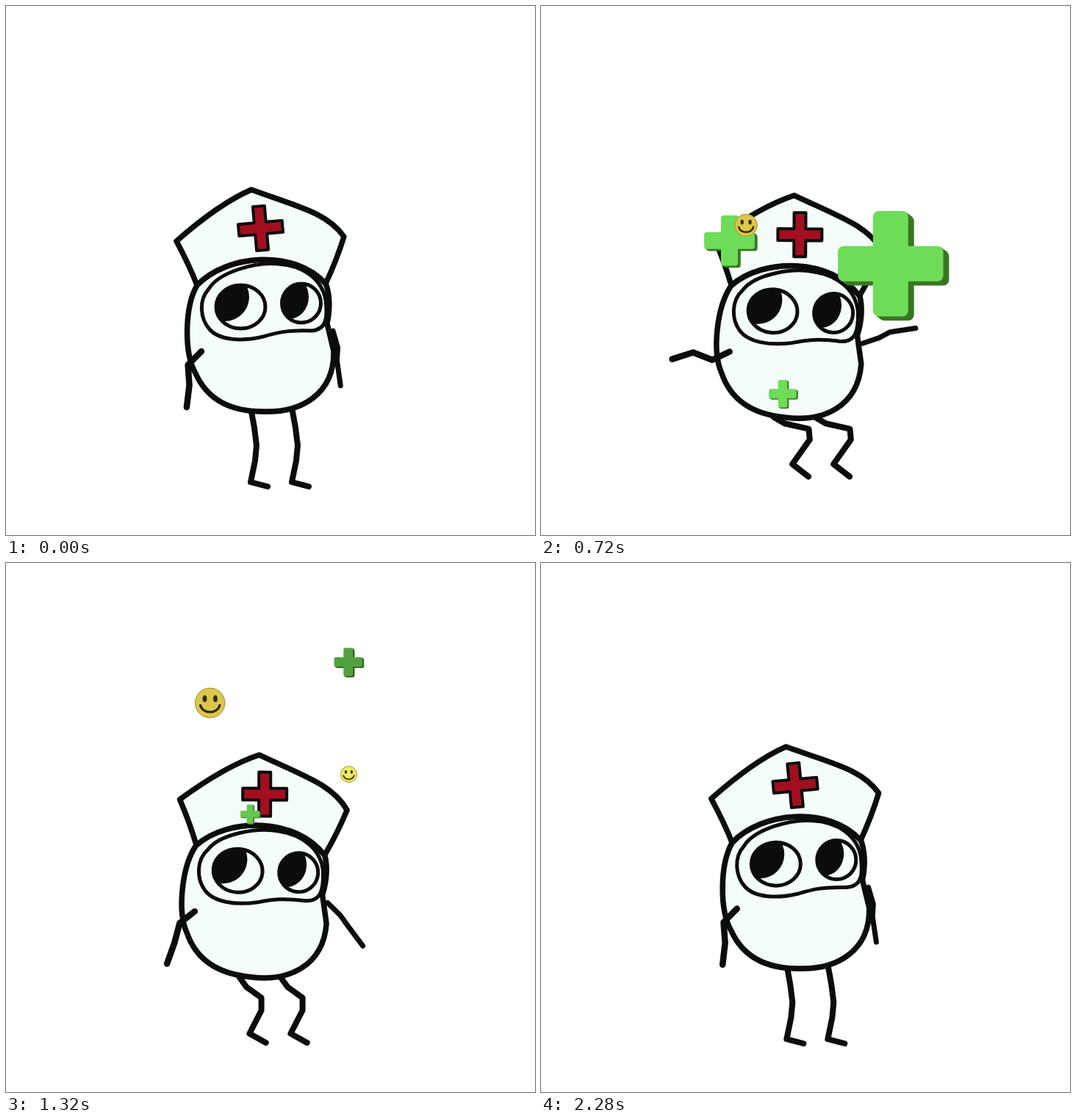
An HTML page with a canvas for the animation above (2340 ms loop, 720 by 720 pixels).

```html
<!DOCTYPE html>
<html lang="en">
<head>
<meta charset="utf-8">
<title>Jumping nurse</title>
<style>
  html, body { margin: 0; width: 100%; height: 100%; overflow: hidden; background: #fff; }
  canvas { display: block; width: 720px; height: 720px; }
</style>
</head>
<body>
<canvas id="stage" width="720" height="720"></canvas>
<script>
const ctx = document.getElementById('stage').getContext('2d');
const LOOP = 2340, STEP = 60, SWAY = 640, RAD = Math.PI / 180;
const INK = '#0b0c0c', CLOTH = '#f5fdfb', RED = '#a20f20';

const hat = new Path2D('M334 250 Q290 269 232 320 Q250 354 260 380 C300 338 392 330 435 378 Q450 346 460 314 C438 282 400 274 334 250Z');
const body = new Path2D('M260 380 C243 410 242 472 258 500 C274 536 305 552 350 552 C402 554 447 528 446 470 L437 432 C442 410 440 390 435 377 C392 330 300 338 260 380Z');
const goggles = new Path2D('M276 385 C290 362 340 348 370 351 C405 353 430 372 435 400 C438 425 436 441 415 442 C385 441 370 444 350 450 C320 457 290 455 277 440 C264 425 262 400 276 385Z');

// The few poses the body passes through; the curve between them is smooth.
const poses = [
  { t: 0, tilt: 0, y: 552, bend: 0, raise: 0 },
  { t: 500, tilt: 6.4, y: 601, bend: 1, raise: 0 },
  { t: 600, tilt: 6.4, y: 599, bend: 1, raise: 0.9 },
  { t: 900, tilt: 3.7, y: 505, bend: 1.15, raise: 1 },
  { t: 1140, tilt: 3, y: 525, bend: 0.35, raise: 0.33 },
  { t: 1540, tilt: 7.4, y: 600, bend: 1, raise: 0 },
  { t: 1860, tilt: 3, y: 557.5, bend: 0, raise: 0 },
  { t: 2280, tilt: -0.4, y: 552, bend: 0, raise: 0 },
  { t: LOOP, tilt: 0, y: 552, bend: 0, raise: 0 }
];

// Each floater rises steadily and sways; y is its height at 900 ms.
const floaters = {
  back: { born: 260, end: 700, life: 900, x: 437, sway: 0, peak: 0, y: 234, rise: 0.35, size: 48 },
  left: { born: 540, end: 1170, life: 1100, x: 259, sway: 18, peak: 1180, y: 218, rise: 0.5625, size: 47.5 },
  big: { born: 300, end: 1400, life: 1150, x: 460, sway: 25, peak: 630, y: 286, rise: 0.36, size: 72 },
  small: { born: 440, end: 1500, life: 1200, x: 330, sway: 12, peak: 550, y: 472, rise: 0.31, size: 21.5 },
  gold: { born: 700, end: 2030, life: 1330, x: 278.5, sway: 5.5, peak: 860, y: 266, rise: 0.18, size: 28 },
  pale: { born: 700, end: 1500, life: 1000, x: 467, sway: 2.5, peak: 880, y: 356, rise: 0.163, size: 21.7 }
};

const mix = (a, b, k) => a + (b - a) * k;
const clamp = v => Math.min(1, Math.max(0, v));

function pose(t) {
  const n = poses.findIndex(p => p.t > t);
  const a = poses[n - 1], b = poses[n];
  const before = poses[n - 2] || a, after = poses[n + 1] || b;
  const d = b.t - a.t, k = (t - a.t) / d;
  const curve = key => {
    const m = (b[key] - before[key]) / (b.t - before.t) * d;
    const w = (after[key] - a[key]) / (after.t - a.t) * d;
    return mix(a[key], b[key], k * k * (3 - 2 * k)) + k * (1 - k) * (m * (1 - k) - w * k);
  };
  const tilt = n > 1 ? curve('tilt') : mix(a.tilt, b.tilt, k * k * (3 - 2 * k));
  return { tilt, x: 345 - 3.25 * tilt, y: curve('y'), bend: curve('bend'), raise: clamp(curve('raise')) };
}

function paint(path, width, fill) {
  if (fill) { ctx.fillStyle = fill; ctx.fill(path); }
  ctx.lineWidth = width;
  ctx.strokeStyle = INK;
  ctx.stroke(path);
}

function oval(x, y, rx, ry) {
  const path = new Path2D();
  path.ellipse(x, y, rx, ry, 0, 0, 7);
  return path;
}

function crossPath(h, w) {
  const path = new Path2D();
  for (let q = 0; q < 4; q++) {
    const c = [1, 0, -1, 0][q], s = [0, 1, 0, -1][q];
    for (const [u, v] of [[w, -w], [h, -w], [h, w]]) path.lineTo(u * c - v * s, u * s + v * c);
  }
  path.closePath();
  return path;
}

function leg(hip, bend) {
  const straight = [[0, 0], [4, 22], [7, 46], [5, 67], [-1, 96], [22, 102]];
  const bent = [[0, 0], [14, 10], [44, 19], [45, 34], [23, 67], [45, 83]];
  const path = new Path2D();
  straight.forEach(([x, y], i) => path.lineTo(hip + mix(x, bent[i][0], bend), mix(y, bent[i][1], bend)));
  paint(path, 8);
}

// Each arm segment is a length with its hanging and raised angle.
function arm(x, y, width, raise, segments) {
  const path = new Path2D();
  path.moveTo(x, y);
  for (const [length, down, up] of segments) {
    const angle = mix(down, up, raise) * RAD;
    path.lineTo(x += length * Math.cos(angle), y += length * Math.sin(angle));
  }
  paint(path, width);
}

function eye(x, y, rx, ry, dx, dy, px, py) {
  const ball = oval(x, y, rx, ry);
  ctx.save();
  ctx.clip(ball);
  ctx.fillStyle = INK;
  ctx.fill(oval(x + dx, y + dy, px, py));
  ctx.restore();
  paint(ball, 5);
}

function nurse(t) {
  const p = pose(t);
  ctx.save();
  ctx.translate(p.x, p.y);
  leg(-11, p.bend);
  leg(45, p.bend);
  ctx.rotate(p.tilt * RAD);
  arm(100, -110, 7, Math.sqrt(p.raise), [[24, 74, -24], [17, 94, -33], [35, 82, -14]]);

  ctx.save();
  ctx.translate(-345, -552);
  paint(body, 7.5, CLOTH);
  paint(hat, 7.5, CLOTH);
  paint(goggles, 5, CLOTH);
  eye(319.5, 409.5, 33.5, 29.5, -21.5, -13.5, 33, 33);
  eye(402, 404.5, 26.5, 26.5, -17, -8.5, 27, 30);
  ctx.translate(346.5, 302.5);
  ctx.rotate(-5 * RAD);
  paint(crossPath(30, 8), 4, RED);
  ctx.restore();

  arm(-79, -82, 8.5, p.raise, [[26, 135, 149], [28, 86, 196], [30, 97, 157]]);
  ctx.restore();
}

function place(f, t, pop) {
  if (t <= f.born || t >= f.end) return null;
  const grown = Math.sin(Math.PI * ((t - f.born) / f.life) ** pop);
  return {
    x: f.x + f.sway * grown * Math.cos((t - f.peak) / SWAY * 2 * Math.PI),
    y: f.y - f.rise * (t - 900),
    size: f.size * grown
  };
}

function plus(f, t) {
  const p = place(f, t, 0.75);
  if (!p || p.size <= 0) return;
  const { x, y, size } = p;
  const r = size * 0.11, path = crossPath(size - r, size * 0.335 - r);
  const shade = clamp((t - f.end + 230) / 200);
  const tone = (a, b) => `rgb(${a.map((v, i) => Math.round(mix(v, b[i], shade)))})`;
  const side = tone([58, 118, 34], [35, 82, 20]), face = tone([111, 220, 88], [74, 140, 54]);
  ctx.lineWidth = r * 2;
  for (let i = 5; i >= 0; i--) {
    ctx.save();
    ctx.translate(x + size * 0.022 * i, y + size * 0.016 * i);
    ctx.fillStyle = ctx.strokeStyle = i ? side : face;
    ctx.fill(path);
    ctx.stroke(path);
    ctx.restore();
  }
}

function smiley(f, t, color) {
  const p = place(f, t, 0.4);
  if (!p) return;
  const { x, y, size: r } = p;
  ctx.save();
  ctx.translate(x, y);
  ctx.scale(r, r);
  ctx.fillStyle = color;
  ctx.fill(oval(0, 0, 1, 1));
  ctx.lineWidth = 0.8 / r;
  ctx.strokeStyle = '#9a842c';
  ctx.stroke(oval(0, 0, 1 - 0.4 / r, 1 - 0.4 / r));
  ctx.fillStyle = ctx.strokeStyle = '#33290f';
  for (const side of [-1, 1]) ctx.fill(oval(side * 0.35, -0.28, 0.14, 0.22));
  ctx.lineWidth = 0.16;
  ctx.stroke(new Path2D('M-.64 .16 C-.45 .76 .45 .76 .64 .16'));
  ctx.restore();
}

function draw(now) {
  const t = Math.floor(now % LOOP / STEP) * STEP;
  ctx.fillStyle = '#fff';
  ctx.fillRect(0, 0, 720, 720);
  ctx.lineCap = ctx.lineJoin = 'round';
  plus(floaters.back, t);
  nurse(t);
  smiley(floaters.pale, t, '#e8ec60');
  plus(floaters.left, t);
  plus(floaters.small, t);
  plus(floaters.big, t);
  smiley(floaters.gold, t, '#dcc64c');
}

const start = performance.now();
function tick() {
  draw(performance.now() - start);
  requestAnimationFrame(tick);
}
tick();
</script>
</body>
</html>
```
